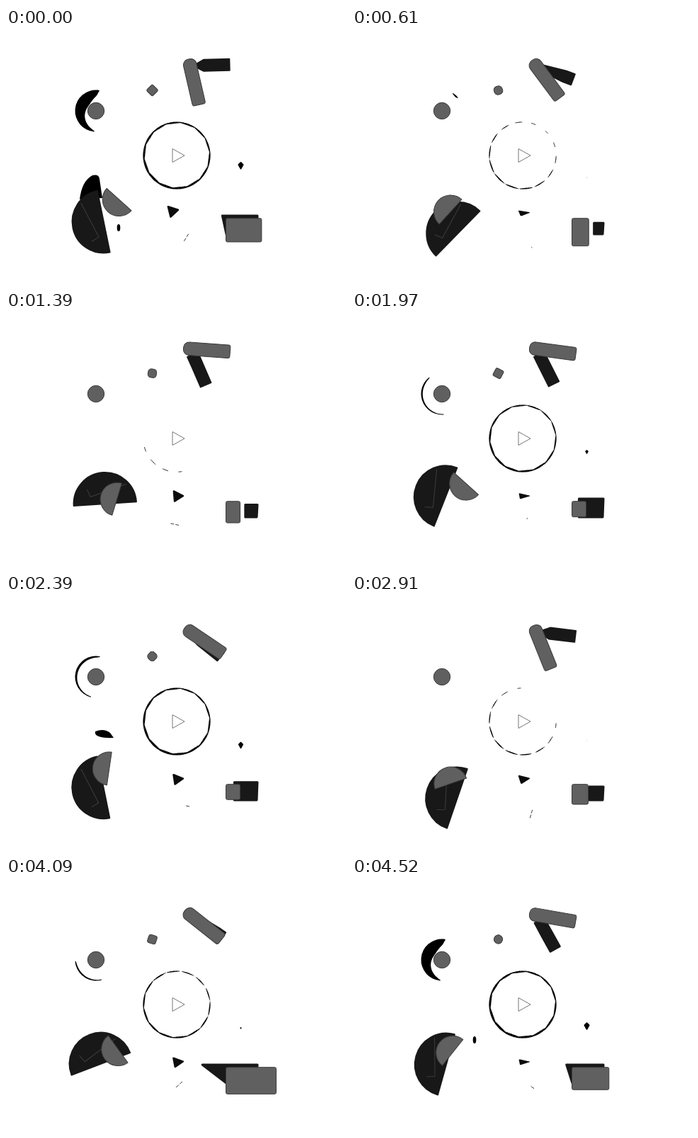
Write an HTML page with a canvas that moves like this. It is 480 px wide and 360 px high and loops after 4.55 s.

```html
<!DOCTYPE html>
<html lang="en">
<head>
<meta charset="utf-8">
<title>Shapes in motion</title>
<style>
html, body { margin: 0; width: 100%; height: 100%; overflow: hidden; background: #fff; }
canvas { display: block; width: 480px; height: 360px; }
</style>
</head>
<body>
<canvas id="stage" width="480" height="360"></canvas>
<script>
const c = document.getElementById('stage').getContext('2d');
const LOOP = 4550, BEAT = 2260, RAD = Math.PI / 180;
const LIGHT = '#606060', DARK = '#181818', BLACK = '#000', EDGE = '#3a3a3a';

const cos = deg => Math.cos(deg * RAD);
const sin = deg => Math.sin(deg * RAD);
const bell = u => Math.exp(-u * u);

// Swings around mid; peak is the time of the highest value.
const wave = (t, period, peak, mid, amp) => mid + amp * cos(360 * (t - peak) / period);

// Smooth bump around a time, wrapped over the loop.
function bump(t, peak, width) {
  const d = Math.abs(t - peak);
  return bell(Math.min(d, LOOP - d) / width);
}

// Position within the beat, -0.5 to 0.5, zero on the beat.
const beat = t => t / BEAT - Math.round(t / BEAT);

function paint(fill, edge, width = 1) {
  c.fillStyle = fill;
  c.fill();
  if (!edge) return;
  c.strokeStyle = edge;
  c.lineWidth = width;
  c.stroke();
}

function line(color, width) {
  c.strokeStyle = color;
  c.lineWidth = width;
  c.stroke();
}

function poly(...points) {
  c.beginPath();
  for (const [x, y] of points) c.lineTo(x, y);
  c.closePath();
}

function box(x, y, w, h, r) {
  c.beginPath();
  c.roundRect(x, y, w, h, r);
}

function half(r) {
  c.beginPath();
  c.arc(0, 0, r, -90 * RAD, 90 * RAD);
  c.closePath();
}

function at(x, y, deg, draw, sx = 1, sy = sx) {
  c.save();
  c.translate(x, y);
  c.rotate(deg * RAD);
  c.scale(sx, sy);
  draw();
  c.restore();
}

// Black disc seen around a slightly shifted polygon that breathes with the beat.
function ring(t) {
  const sides = 14, step = 360 / sides, outer = 47.4;
  const r = wave(t, BEAT, 0, 47.5, -1.4);
  for (let a = 0; a < 360; a += 2) {
    const hole = r * cos(step / 2) / cos((a + 6) % step - step / 2);
    const gap = outer - hole + .5 * cos(a - 130);
    if (gap < .35) continue;
    c.beginPath();
    c.arc(241, 180, outer - gap / 2, (a - 1.2) * RAD, (a + 1.2) * RAD);
    line(BLACK, gap + .3);
  }
}

function play() {
  poly([235, 170.5], [252, 180], [235, 189.5]);
  line('#555', .8);
}

function arms(t) {
  const period = 3270, swing = 360 * t / period;
  const neck = wave(t, period, 0, 5.5, -3);
  const knee = 19 + 28 * Math.max(0, sin(swing)) ** 2;
  at(260, 53.3, wave(t, period, 0, 34.5, -36), () => {
    poly([9, -neck], [knee, -8], [55.5, -8], [55.5, 8], [knee, 8], [9, neck]);
    paint(DARK, DARK, 2);
  });
  at(260, 53.3, wave(t, period, 0, 38.5, 38.5), () => {
    box(-9.5, -9.3, 66, 18.6, [8, 3, 3, 8]);
    paint(LIGHT, EDGE);
  });
}

function eye(t) {
  const p = beat(t);
  const sweep = 185 * (1 - (p / .285) ** 2);
  if (sweep > 0) {
    const from = 187 + 1700 * p * Math.abs(p) - sweep / 2;
    const thick = 1.5 + 14.5 * bell(p / .035);
    c.beginPath();
    c.arc(127, 117, 29.5, from * RAD, (from + sweep) * RAD);
    for (let u = 1; u >= 0; u -= 1 / 32) {
      const r = 28.7 - thick * Math.sqrt(Math.abs(sin(180 * u ** 1.6)));
      c.lineTo(127 + r * cos(from + sweep * u), 117 + r * sin(from + sweep * u));
    }
    c.closePath();
    paint(BLACK);
  }
  c.beginPath();
  c.arc(127, 117, 11.7, 0, 7);
  paint(LIGHT, EDGE);
}

function halves(t) {
  at(125, 240, 0, () => {
    c.beginPath();
    c.moveTo(-21, 2);
    c.quadraticCurveTo(-18, -24, -3, -32);
    c.quadraticCurveTo(6, -34, 7, -27);
    c.lineTo(11, 0);
    c.closePath();
    paint(BLACK);
  }, Math.exp(-t / 150));

  const x = wave(t, 2400, 740, 141, 9), y = wave(t, 2400, 680, 276.2, 14);
  at(x, y, wave(t, 2500, 1201, 220, 52), () => {
    half(44.2);
    paint(DARK, DARK, 2);
    c.beginPath();
    c.moveTo(26, 32);
    c.lineTo(11, -20);
    c.lineTo(22, -24);
    line('#3c3c3c', 1);
  });

  const lx = wave(t, 2022, -270, 151, 13), ly = wave(t, 2093, -1017, 257, 15);
  at(lx, ly, wave(t, 1967, -1038, 191, 60), () => {
    half(23.5);
    paint(LIGHT, EDGE);
  });
}

function cards(t) {
  const swell = bump(t, 4060, 680), right = 355;
  const w = 8 + 70 * swell + 28 * bump(t, 2130, 700);
  const left = right - w, top = Math.max(265, 282 - w / 2);
  poly([left, top], [right, top], [right - 1, 291], [Math.max(left, 311), 291]);
  paint(DARK, DARK, 3);
  box(310.5, 268.7, 20 + 51 * swell, wave(t, 3200, 610, 30, 9), 2);
  paint(LIGHT, EDGE);
}

function gem(t) {
  const s = 6 * (1 - bump(t, 2890, 150));
  const r = Math.min(s, wave(t, 1900, 0, 4.2, -2));
  if (s > .3) at(206.5, 88, 45 + .0374 * t, () => {
    box(-s, -s, 2 * s, 2 * s, r);
    paint(LIGHT, EDGE);
  });
}

function wedge(t) {
  at(243 - 7 * Math.exp(-t / 150), 261 - 3 * Math.exp(-t / 150), 0, () => {
    c.rotate(wave(t, 3300, 0, -5, -5) * RAD);
    poly([-6, -7], [7, 0], [-5, 8]);
    paint('#0c0c0c', '#0c0c0c', 2.5);
  }, 1, wave(t, 1303, 610, .72, -.28));
}

function dash(t) {
  const x = wave(t, BEAT, 300, 248, 9), y = wave(t, BEAT, 800, 302, 9);
  at(x, y, 122 + .18 * t, () => {
    const l = wave(t, 1390, 0, 3.7, 3.2);
    c.beginPath();
    c.moveTo(-l, 0);
    c.lineTo(l, 0);
    c.setLineDash([5, 2]);
    line('#222', .8);
  });
}

function specks(t) {
  const p = beat(t);
  at(331.5, wave(t, 1700, 0, 204.5, -10.5), 0, () => {
    poly([0, -4], [3, -1], [0, 4.5], [-3, -1]);
    paint(BLACK, BLACK, 2);
  }, bell(p / .17));

  at(wave(t, 1808, 0, 166, -7), wave(t, 1808, 0, 256, 26), 0, () => {
    c.beginPath();
    c.ellipse(0, 0, 2.3, 5, 0, 0, 7);
    paint(BLACK);
  }, bell(p / .03));

  at(138, 197, 0, () => {
    c.beginPath();
    c.moveTo(-12, -3);
    c.quadraticCurveTo(0, -8, 9, -1);
    c.lineTo(14, 6);
    c.quadraticCurveTo(-9, 7, -12, 0);
    c.closePath();
    paint(BLACK);
  }, bump(t, 2390, 90));
}

const parts = [ring, play, arms, eye, halves, cards, gem, wedge, dash, specks];
let start;

function frame(now) {
  start ??= now;
  const t = (now - start) % LOOP;
  c.lineJoin = 'round';
  c.clearRect(0, 0, 480, 360);
  for (const draw of parts) draw(t);
  requestAnimationFrame(frame);
}

requestAnimationFrame(frame);
</script>
</body>
</html>
```
